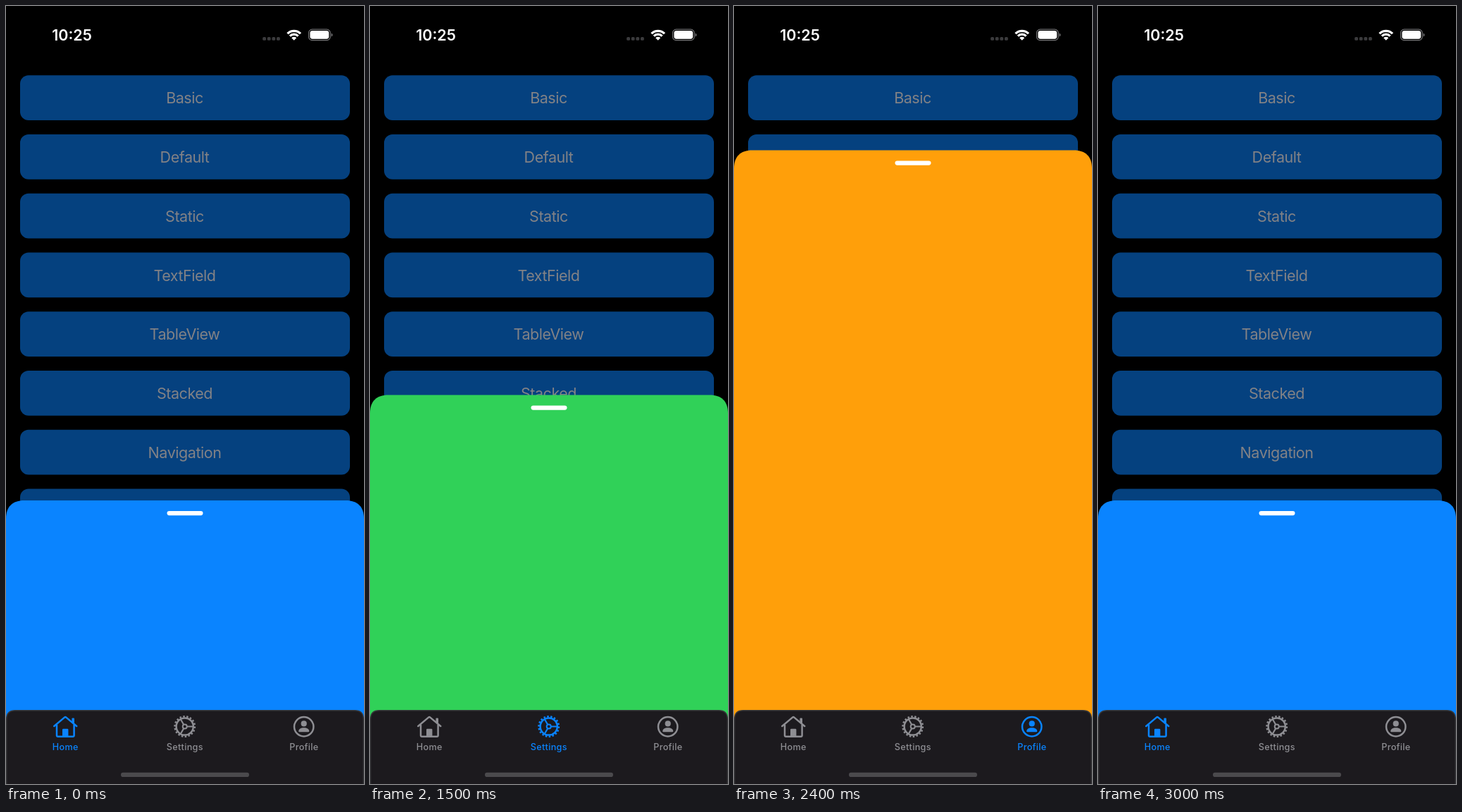
These frames come from a looping animation (508 by 1103 pixels, 3100 ms). An HTML page:

```html
<!DOCTYPE html>
<html lang="en">
<head>
<meta charset="utf-8">
<title>Bottom sheet tabs</title>
<style>
  html, body { margin: 0; width: 100%; height: 100%; overflow: hidden; background: #000; }
  svg { display: block; width: 100vw; height: 100vh; font-family: Inter, sans-serif; text-anchor: middle; }
  .button rect { fill: #05417f; }
  .button text { fill: #828286; font-size: 21.5px; letter-spacing: -.45px; }
  .clock { fill: #fff; font-size: 21.5px; font-weight: 600; }
  .tab { color: #8e8e93; fill: none; stroke: currentColor; stroke-width: 2.5; }
  .tab.on { color: #0a84ff; }
  .tab text, .solid { fill: currentColor; stroke: none; }
  .tab text { font-size: 12.6px; font-weight: 500; letter-spacing: .35px; }
</style>
</head>
<body>
<svg viewBox="0 0 508 1103">
  <rect width="508" height="1103"/>

  <text class="clock" x="93.5" y="48.7">10:25</text>
  <g fill="#3b3b3d">
    <rect x="364.2" y="44" width="4.8" height="4.8" rx="1.6"/>
    <rect x="370.8" y="44" width="4.8" height="4.8" rx="1.6"/>
    <rect x="377.4" y="44" width="4.8" height="4.8" rx="1.6"/>
    <rect x="384" y="44" width="4.8" height="4.8" rx="1.6"/>
  </g>
  <g fill="none" stroke="#fff" stroke-width="3.1">
    <path d="M399.4 39.2A13.2 13.2 0 0 1 418 39.2M402.8 42.6A8.3 8.3 0 0 1 414.6 42.6"/>
    <path d="M408.7 48.8L405.2 45.2A5 5 0 0 1 412.2 45.2Z" fill="#fff" stroke="none"/>
  </g>
  <rect x="429.5" y="33.2" width="30.6" height="15.4" rx="5" fill="none" stroke="#747476" stroke-width="1.2"/>
  <rect x="431.4" y="35.1" width="26.8" height="11.6" rx="3.4" fill="#fff"/>
  <path d="M461.6 38.4Q463.5 39.3 463.5 40.9T461.6 43.4Z" fill="#747476"/>

  <g id="list"></g>

  <g id="sheet">
    <path id="panel" d="M0 26C0 9 9 0 26 0H482C499 0 508 9 508 26V1103H0Z"/>
    <rect x="228.5" y="15" width="51" height="6.2" rx="3.1" fill="#fff"/>
  </g>

  <path d="M.7 1104V1011Q.7 998.7 13 998.7H495Q507.3 998.7 507.3 1011V1104Z" fill="#1c1a1e" stroke="#37383a" stroke-width="1.4"/>

  <g class="tab">
    <path d="M68.3 1021L83 1008.6Q84.2 1007.6 85.4 1008.6L100.2 1021" stroke-linecap="round"/>
    <path d="M72 1019V1034Q72 1035.8 73.8 1035.8H94.8Q96.6 1035.8 96.6 1034V1019"/>
    <path class="solid" d="M93.4 1010.5Q93.4 1009.6 94.3 1009.6H96.1Q97 1009.6 97 1010.5V1018.5L93.4 1015.5ZM80 1036V1026Q80 1024.7 81.3 1024.7H87.1Q88.4 1024.7 88.4 1026V1036Z"/>
    <text x="84.3" y="1055">Home</text>
  </g>
  <g class="tab">
    <circle cx="253.7" cy="1021.5" r="12.1"/>
    <circle cx="253.7" cy="1021.5" r="14.2" pathLength="36" stroke-dasharray="1 1"/>
    <circle cx="253.7" cy="1021.5" r="3" stroke-width="2"/>
    <path d="M257 1021.5H265.5M252.1 1018.6L247.8 1011.2M252.1 1024.4L247.8 1031.8" stroke-width="2.1"/>
    <text x="253.8" y="1055">Settings</text>
  </g>
  <g class="tab">
    <circle cx="422.7" cy="1021.7" r="13.7"/>
    <circle class="solid" cx="422.7" cy="1017.4" r="4.1"/>
    <path class="solid" d="M415.2 1028.2C415.2 1025 418.4 1023.2 422.7 1023.2S430.2 1025 430.2 1028.2Q430.2 1029.2 429.2 1029.2H416.2Q415.2 1029.2 415.2 1028.2Z"/>
    <text x="422.9" y="1055">Profile</text>
  </g>
  <rect x="163" y="1086.8" width="182" height="6.2" rx="3.1" fill="#4b4a4d"/>
</svg>
<script>
  const LOOP = 3100, STEP = 100, SPEED = 0.025;
  const pages = [
    { top: 701, rgb: [10, 132, 255] },
    { top: 551.5, rgb: [48, 209, 88] },
    { top: 204.5, rgb: [255, 159, 10] }
  ];
  const moves = [
    { start: 842, from: 0, to: 1 },
    { start: 1636, from: 1, to: 2 },
    { start: 2451, from: 2, to: 0 }
  ];

  const $ = id => document.getElementById(id);
  const sheet = $('sheet'), panel = $('panel');
  const tabs = document.querySelectorAll('.tab');

  const labels = ['Basic', 'Default', 'Static', 'TextField', 'TableView', 'Stacked', 'Navigation', ''];
  $('list').innerHTML = labels.map((label, i) =>
    `<g class="button" transform="translate(20 ${98.3 + i * 83.75})">
      <rect width="468" height="63.6" rx="12"/><text x="233.5" y="40">${label}</text>
    </g>`).join('');

  const mix = (a, b, p) => a + (b - a) * p;

  // Remaining distance of a critically damped spring
  const rest = ms => (1 + ms * SPEED) * Math.exp(-ms * SPEED);

  function draw(now) {
    const t = Math.floor(now % LOOP / STEP) * STEP;
    const move = moves.filter(m => t >= m.start).pop() || { start: -LOOP, from: 2, to: 0 };
    const a = pages[move.from], b = pages[move.to];
    const left = rest(t - move.start);
    const fade = 1 - left ** 1.5;

    sheet.setAttribute('transform', `translate(0 ${mix(a.top, b.top, 1 - left).toFixed(2)})`);
    panel.setAttribute('fill', `rgb(${a.rgb.map((c, i) => Math.round(mix(c, b.rgb[i], fade)))})`);
    tabs.forEach((tab, i) => tab.classList.toggle('on', i === move.to));
  }

  function tick() {
    draw(performance.now());
    requestAnimationFrame(tick);
  }
  tick();
</script>
</body>
</html>
```
